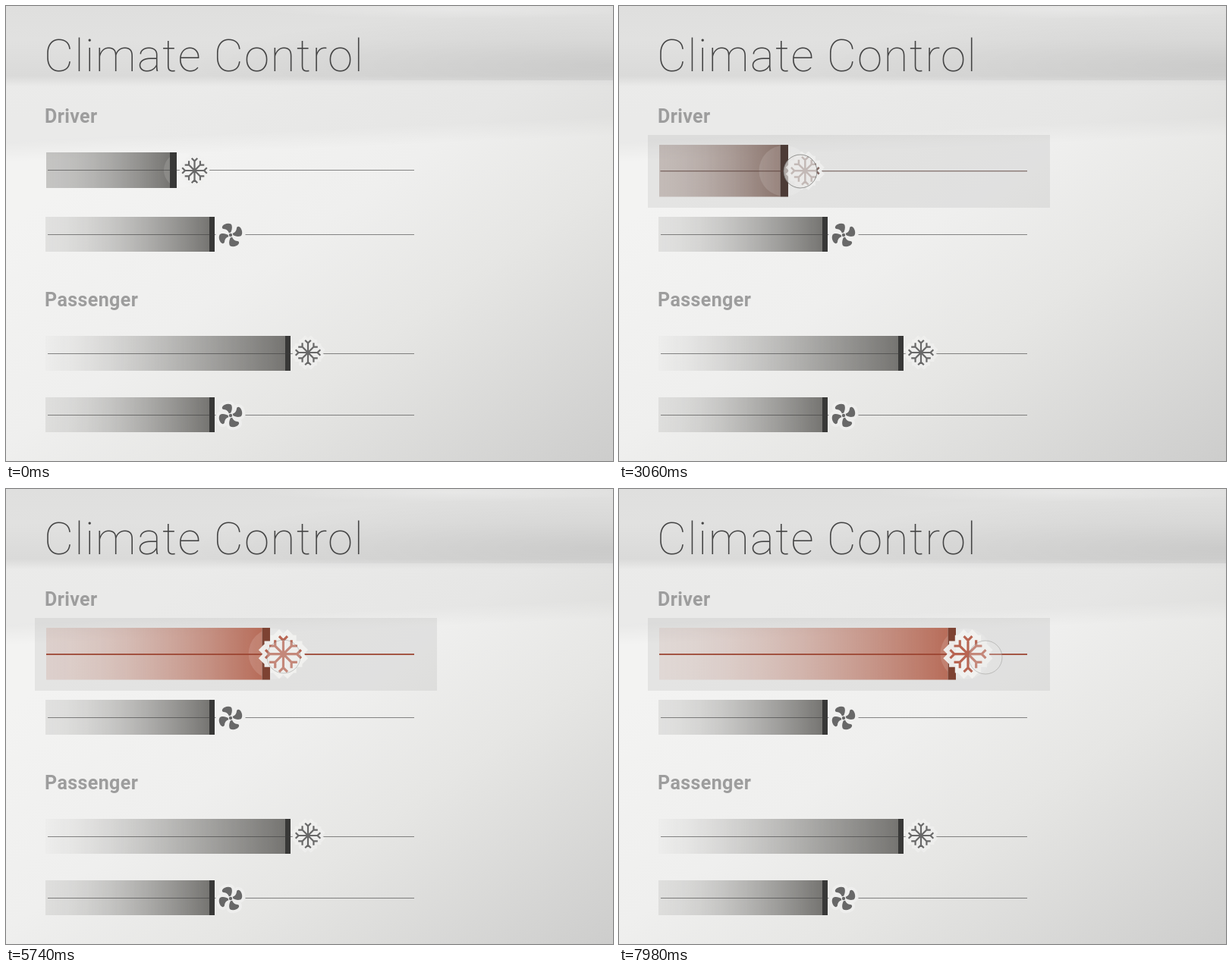
These frames come from a looping animation (800 px wide and 600 px high, 8000 ms). An HTML page with a canvas:

```html
<!DOCTYPE html>
<html lang="en">
<head>
<meta charset="utf-8">
<title>Climate Control</title>
<style>
html, body { margin: 0; width: 800px; height: 600px; overflow: hidden; }
body {
  position: relative;
  font-family: Roboto, sans-serif;
  background:
    radial-gradient(ellipse 260px 13px at 590px 4px, #fff4, #fff0) no-repeat,
    radial-gradient(ellipse 560px 70px at 100% 78px, #00000014, #0000) 0 0/800px 98px no-repeat,
    linear-gradient(#dfdfde, #e1e1e0 45px, #dadad9 92px, #dfdfde00 106px) no-repeat,
    linear-gradient(177.5deg, #00000009 120px, #0000000a 180px, #0000 206px) no-repeat,
    linear-gradient(145deg, #f3f3f2 25%, #efefee 50%, #e6e6e4 68%, #cdcdcc);
}
h1, h2, canvas { position: absolute; margin: 0; white-space: nowrap; line-height: 0; }
h1 { left: 50px; top: 65.5px; font-size: 60px; font-weight: 100; letter-spacing: 1.4px; color: #444; }
h2 { left: 51px; font-size: 25px; font-weight: 700; letter-spacing: .4px; color: #9d9d9d; }
canvas { left: 0; top: 0; }
</style>
</head>
<body>
<h1>Climate Control</h1>
<h2 style="top:145.5px">Driver</h2>
<h2 style="top:388px">Passenger</h2>
<canvas width="800" height="600"></canvas>
<script>
const ctx = document.querySelector('canvas').getContext('2d');
const LOOP = 8000;

const mix = (a, b, k) => a + (b - a) * k;
const rgba = (c, a = 1) => `rgba(${c.map(Math.round)},${a})`;
const tint = (grey, red, k) => grey.map((v, i) => mix(v, red[i], k));

// Eases from 0 to 1 between two times
function ramp(t, from, to, power = 2) {
  const u = Math.min(1, Math.max(0, (t - from) / (to - from)));
  return u < .5 ? (2 * u) ** power / 2 : 1 - (2 - 2 * u) ** power / 2;
}

// Icons are drawn around 0,0 at their resting size
const snow = new Path2D();
for (let i = 0; i < 8; i++) {
  const r = i % 2 ? 15 : 17, fork = r - 4.5, barb = 3.8;
  const at = (along, across) => {
    const a = i * Math.PI / 4, c = Math.cos(a), s = Math.sin(a);
    return [along * c - across * s, along * s + across * c];
  };
  snow.moveTo(0, 0);
  snow.lineTo(...at(fork, 0));
  snow.moveTo(...at(fork + barb, -barb));
  snow.lineTo(...at(fork, 0));
  snow.lineTo(...at(fork + barb, barb));
}

const blade = new Path2D('M-.5 -2C1.5 -6 2.5 -9 1.5 -13C.5 -15.5 -4 -16 -8 -14C-12 -12 -12 -8.5 -9 -8C-5.5 -7.5 -3 -6 -2 -2Z');
const fan = new Path2D();
for (let i = 0; i < 4; i++) fan.addPath(blade, new DOMMatrix().rotate(i * 90));

function disc(x, y, r, fill) {
  ctx.beginPath();
  ctx.arc(x, y, r, 0, 7);
  ctx.fillStyle = fill;
  ctx.fill();
}

function icon(path, x, y, scale, color) {
  const outline = path === snow;
  ctx.save();
  ctx.translate(x, y);
  ctx.scale(scale, scale);
  ctx.strokeStyle = `rgba(241,241,239,${mix(.75, .97, (scale - 1) / .44)})`;
  ctx.lineWidth = outline ? 9 : 8;
  ctx.lineJoin = outline ? 'miter' : 'round';
  ctx.lineCap = 'square';
  ctx.stroke(path);
  ctx.strokeStyle = ctx.fillStyle = color;
  ctx.lineWidth = 2.2;
  ctx.lineCap = 'butt';
  if (outline) ctx.stroke(path);
  else {
    ctx.fill(path);
    disc(0, 0, 3.2, '#eee');
    disc(0, 0, 2.2, color);
  }
  ctx.restore();
}

function slider(s) {
  const { x, end, y, h, strip, fade, curve = 1.6, heat = 0, scale = 1 } = s;
  const top = y - h / 2, width = end - x;
  const color = tint([111, 110, 107], [181, 102, 82], heat);
  const shade = ctx.createLinearGradient(x, 0, end - strip, 0);
  for (let f = 0; f <= 1; f += .125) {
    shade.addColorStop(f, rgba(color, fade + (.95 - fade) * f ** curve));
  }
  ctx.fillStyle = shade;
  ctx.fillRect(x, top, width - strip, h);
  if (s.glow) disc(s.glow.x, y, s.glow.r, 'rgba(255,255,255,.13)');
  ctx.fillStyle = rgba(tint([56, 56, 55], [125, 66, 50], heat));
  ctx.fillRect(end - strip, top, strip, h);

  const gap = 19.5 * scale, thick = 1 + heat;
  ctx.fillStyle = rgba(tint([60, 60, 60], [155, 68, 48], heat), mix(.6, .88, heat));
  const left = mix(55, 53, heat), lineTop = Math.floor(y);
  ctx.fillRect(left, lineTop, s.iconX - gap - left, thick);
  ctx.fillRect(s.iconX + gap, lineTop, 538 - s.iconX - gap, thick);
  icon(s.path, s.iconX, s.iconY, scale, rgba(tint([104, 104, 104], [184, 101, 82], heat)));
}

function driverTemperature(t) {
  const grow = ramp(t, 1320, 1800), heat = ramp(t, 2900, 3320);
  const end = 225 - 2 * grow + 114 * ramp(t, 3620, 4280, 3) + 3 * ramp(t, 4460, 4620)
    + 8 * ramp(t, 5420, 5740) + 96 * ramp(t, 6500, 7300);
  const moved = end - 223;

  ctx.fillStyle = `rgba(0,0,0,${.06 * grow})`;
  ctx.fillRect(38, 170, 530, 96);
  slider({
    x: 53, end, heat, path: snow,
    y: mix(216.5, 217.3, grow),
    h: mix(47, 68.5, grow),
    strip: mix(9, 10.5, grow),
    fade: Math.max(.1, .35 - moved * .0015),
    scale: 1 + .44 * heat,
    iconX: end + mix(23.5, 19.4 - moved * .0155, heat),
    iconY: mix(217, 217.7, heat),
    glow: { x: mix(231, 218 + moved * 1.0814, grow), r: mix(23, 33.5, grow) }
  });
}

function touch(t) {
  if (t < 500) return;
  const arrive = ramp(t, 500, 1300), firstPress = ramp(t, 2360, 2460);
  const firstDrag = ramp(t, 3620, 4280, 3), secondDrag = ramp(t, 6500, 7360);
  const x = 752 - 511 * arrive - 2 * firstPress + 123 * firstDrag
    + 4 * ramp(t, 4460, 4620) + 117 * secondDrag;
  const y = -25 + 240 * arrive + 3 * firstPress + 3 * firstDrag + secondDrag;
  const press = firstPress - ramp(t, 5420, 5740) + ramp(t, 6120, 6140) - ramp(t, 7700, 7980);
  disc(x, y, 25 - 3 * firstPress, `rgba(230,229,227,${mix(.27, .65, press)})`);
  ctx.strokeStyle = `rgba(115,115,113,${mix(.35, .75, press)})`;
  ctx.lineWidth = 1;
  ctx.stroke();
}

function draw() {
  const t = performance.now() % LOOP;
  ctx.clearRect(0, 0, 800, 600);
  driverTemperature(t);
  const still = { x: 52, h: 46, strip: 7 };
  const air = { ...still, end: 275, fade: .13, path: fan, iconX: 296 };
  slider({ ...air, y: 301, iconY: 302 });
  slider({ ...still, end: 375, fade: .02, curve: 1.3, path: snow, iconX: 398, y: 458, iconY: 457 });
  slider({ ...air, y: 539, iconY: 540 });
  touch(t);
  requestAnimationFrame(draw);
}
draw();
</script>
</body>
</html>
```
